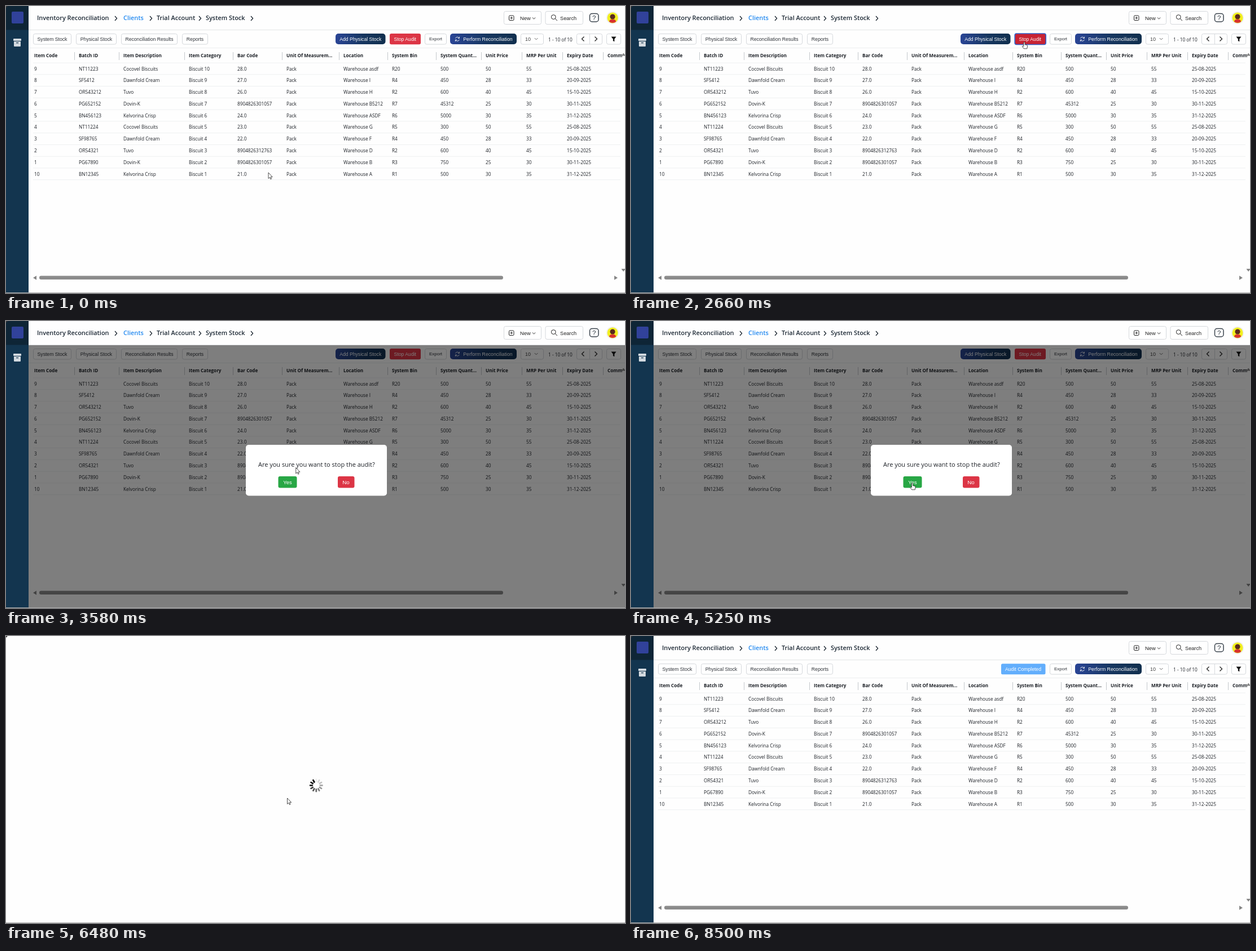
An HTML page that plays this animation: 1097 px wide and 510 px high, repeating every 9.34 s.

```html
<!DOCTYPE html>
<html lang="en">
<head>
<meta charset="utf-8">
<title>Stock audit</title>
<style>
  html, body { margin: 0; width: 100%; height: 100%; overflow: hidden; background: #fefefe; }
  svg { display: block; width: 100vw; height: 100vh; }
  text { font-family: "Open Sans", "Noto Sans", sans-serif; fill: #1d2127; white-space: pre; }
  .ui { font-family: "Liberation Sans", Arial, sans-serif; }
</style>
</head>
<body>
<svg id="stage" viewBox="0 0 1097 510">
  <defs>
    <linearGradient id="navy"><stop offset="0" stop-color="#2a4596"/><stop offset=".55" stop-color="#16365f"/><stop offset="1" stop-color="#112f4e"/></linearGradient>
  </defs>
  <g id="shell"></g>
  <g id="tools"></g>
  <g id="auditOpen"></g>
  <g id="auditDone"></g>
  <g id="rows"></g>
  <g id="modal"></g>
  <g id="spinner"></g>
  <path d="M0 0H3L0 3Z" fill="#333"/>
  <path d="M0 509.5H1097" stroke="#b0b0b0"/>
  <path id="arrow" d="M0 0V10.6L2.4 8.4L3.9 11.8L5.5 11.1L4 7.8H7.2Z" fill="#fff" stroke="#222" stroke-width=".8"/>
  <path id="hand" d="M0 0Q1.1 0 1.1 1.2V4.6L4.6 5.4Q5.7 5.8 5.6 7L4.8 11.8H-.8L-3.7 7.8Q-3.2 6.4-1.9 7.2L-1.1 8V1.2Q-1.1 0 0 0Z" fill="#fff" stroke="#222" stroke-width=".8"/>
</svg>
<script>
const LOOP = 9340;
const el = id => document.getElementById(id);

// Drawing helpers, each returning SVG markup
const text = (x, y, s, size, attrs = '') => `<text x="${x}" y="${y}" font-size="${size}" ${attrs}>${s}</text>`;
const ui = (x, y, s, size = 8.67, fill = '#30343a', anchor = 'middle') =>
  text(x, y, s, size, `class="ui" text-anchor="${anchor}" style="fill:${fill}"`);
const box = (x, y, w, h, fill, r = 0, attrs = '') =>
  `<rect x="${x}" y="${y}" width="${w}" height="${h}" rx="${r}" fill="${fill}" ${attrs}/>`;
const outline = (x1, x2, y = 49, h = 19.5) => box(x1 + .5, y + .5, x2 - x1 - 1, h - 1, '#fff', 3, 'stroke="#d5d8dc"');
const line = (d, stroke, w = 1) => `<path d="${d}" fill="none" stroke="${stroke}" stroke-width="${w}"/>`;
const shape = (d, fill) => `<path d="${d}" fill="${fill}"/>`;

function drawShell() {
  const crumbs = [[55, 'Inventory Reconciliation'], [208, 'Clients'], [267, 'Trial Account'], [354, 'System Stock']];
  return line('M40 42.5H1097', '#e2e4e6') +
    box(0, 0, 40, 510, '#13354f') + box(0, 0, 40, 42.5, '#0e2536') +
    box(10, 10, 21, 21, '#31429a', 2) +
    box(13, 58, 14, 4, '#d3dae0', 1) + shape('M14 63H26V71Q26 72 25 72H15Q14 72 14 71Z', '#d3dae0') +
    line('M18 65.5H22', '#13354f', 1.3) +
    crumbs.map(([x, s]) => text(x, 25, s, 10.9,
      `font-weight="600" style="fill:${s === 'Clients' ? '#2088f0' : '#1b2733'}"`)).join('') +
    [193, 255, 342, 434].map(x => line(`M${x} 18L${x + 3.5} 22L${x} 26`, '#222c36', 1.4)).join('') +
    outline(882, 949, 9, 24) + outline(955.5, 1023, 9, 24) +
    box(891.5, 17, 8.5, 8.5, 'none', 1.5, 'stroke="#222"') + line('M893.5 21.2H898M895.8 19V23.5', '#222') +
    ui(911, 25, 'New', 9.4, '#222', 'start') + line('M933 20.5L935.6 23L938.2 20.5', '#222') +
    '<circle cx="970.3" cy="19.6" r="3.9" fill="none" stroke="#222"/>' + line('M973.2 22.5L977 26.2', '#222') +
    ui(982, 25, 'Search', 9.2, '#222', 'start') +
    box(1034.5, 13.5, 15.5, 14.5, 'none', 4, 'stroke="#3a434c" stroke-width="1.5"') +
    ui(1042.3, 25, '?', 11.5, '#27313a') +
    box(1064, 10, 22, 22, '#f0eef0', 10) + '<circle cx="1075" cy="21" r="9.5" fill="#f2f020"/>' +
    shape('M1069 28Q1069 23.5 1075 23.5T1081 28Q1075 32 1069 28Z', '#d8322e') +
    '<circle cx="1075" cy="19" r="4.6" fill="#5a2a1c"/>';
}

const columns = [50, 129, 208, 324, 410, 497, 598, 684, 770, 850, 922, 994, 1066];
const titles = ['Item Code', 'Batch ID', 'Item Description', 'Item Category', 'Bar Code', 'Unit Of Measurem...',
  'Location', 'System Bin', 'System Quant...', 'Unit Price', 'MRP Per Unit', 'Expiry Date', 'Comm'];

function drawTools() {
  const tabs = [[48, 116, 'System Stock'], [124, 196, 'Physical Stock'], [204, 304, 'Reconciliation Results'], [312, 358, 'Reports']];
  return tabs.map(([a, b, s]) => outline(a, b) + ui((a + b) / 2, 61.7, s)).join('') +
    outline(742, 781) + ui(761.5, 61.3, 'Export', 8) +
    box(787, 49, 118, 19, 'url(#navy)', 5) + ui(854, 61.5, 'Perform Reconciliation', 8.7, '#fff') +
    line('M796.5 57.5A3.6 3.6 0 0 1 803 57M803.4 54.6V57.3H800.8M803.4 59.8A3.6 3.6 0 0 1 797 60.6M796.4 63V60.2H799', '#fff', .9) +
    outline(912, 953) + ui(920, 61.7, '10', 9, '#444', 'start') + line('M936.8 57L939.6 59.8L942.4 57', '#666') +
    text(961, 62.5, '1 - 10 of 10', 8.3) +
    outline(1011, 1057) + line('M1034.5 49V68', '#d5d8dc') +
    line('M1024.5 54.5L1020.5 58.5L1024.5 62.5M1043.5 54.5L1047.5 58.5L1043.5 62.5', '#222', 1.3) +
    outline(1064, 1090) + shape('M1072.5 54.5H1081.5L1078.3 58.8V63.2L1075.8 62V58.8Z', '#111') +
    line('M40 74.5H1097', '#eceef0') +
    titles.map((s, i) => text(columns[i], 91, s, 8.15, 'font-weight="700"') +
      (i ? line(`M${columns[i] - 7.5} 82V96`, '#c4c8cc') : '')).join('') +
    box(59, 479.5, 822, 6.5, '#8b8b8b', 3.2) +
    shape('M48 483L54 479.3V486.7ZM1084 483L1078 479.3V486.7ZM1090.5 88.5L1094.2 83.5L1098 88.5ZM1090.5 467L1094.2 472L1098 467Z', '#858585');
}

function drawRows() {
  const products = [
    ['Cocovel Biscuits', 50, 55, '25-08-2025'],
    ['Dawnfold Cream', 28, 33, '20-09-2025'],
    ['Tuvo', 40, 45, '15-10-2025'],
    ['Dovin-K', 25, 30, '30-11-2025'],
    ['Kelvorina Crisp', 30, 35, '31-12-2025']];
  // code, batch, bar code, location, bin, quantity
  const stock = `9 NT11223 28.0 asdf R20 500
8 SF5412 27.0 I R4 450
7 OR543212 26.0 H R2 600
6 PG652152 8904826301057 B5212 R7 45312
5 BN456123 24.0 ASDF R6 5000
4 NT11224 23.0 G R5 300
3 SF98765 22.0 F R4 450
2 OR54321 8904826312763 D R2 600
1 PG67890 8904826301057 B R3 750
10 BN12345 21.0 A R1 500`.split('\n');
  return stock.map((row, i) => {
    const [code, batch, bar, place, bin, quantity] = row.split(' ');
    const [name, price, mrp, expiry] = products[i % 5];
    const cells = [code, batch, name, `Biscuit ${10 - i}`, bar, 'Pack', `Warehouse ${place}`, bin, quantity, price, mrp, expiry];
    const y = 114.6 + 20.77 * i;
    return cells.map((s, k) => text(columns[k], y, s, 8.25)).join('') + line(`M48 ${y + 7.2}H1089`, '#eef0f1');
  }).join('') + line('M48 101H1089', '#eef0f1');
}

const drawSpinner = () => Array.from({ length: 12 }, (_, k) =>
  `<path d="M0-7V-10.7" stroke="#000" stroke-width="2.8" stroke-linecap="round" opacity="${.06 + .94 * k / 11}" transform="rotate(${30 * k})"/>`).join('');

el('shell').innerHTML = drawShell();
el('tools').innerHTML = drawTools();
el('rows').innerHTML = drawRows();
el('spinner').innerHTML = drawSpinner();
el('auditOpen').innerHTML = box(584, 49, 88.5, 19, 'url(#navy)', 5) + ui(628.2, 61.5, 'Add Physical Stock', 8.67, '#fff') +
  box(680, 49, 55, 19.3, '#dc3545', 3, 'id="stop"') + ui(707.3, 61.5, 'Stop Audit', 8.67, '#fff') +
  box(680.2, 49, 55, 19.5, 'none', 3, 'id="ring" stroke="#2f62cc" stroke-width="1.6"') +
  line('M1082 51V66', '#222').replace('<path', '<path id="caret"');
el('auditDone').innerHTML = box(656, 49.3, 78.5, 19, '#62aefc', 2.5) + ui(695, 61.5, 'Audit Completed', 8.67, '#fff');
el('modal').innerHTML = box(40, 43, 1057, 467, '#000', 0, 'opacity=".5"') + box(425, 220, 250, 90.5, '#fff', 5) +
  text(550.3, 258.7, 'Are you sure you want to stop the audit?', 11, 'text-anchor="middle"') +
  box(482.5, 276, 33, 20.5, '#28a745', 3) + ui(499, 289.5, 'Yes', 9.4, '#fff') +
  box(588, 276, 29.5, 20.5, '#dc3545', 3) + ui(602.5, 289.5, 'No', 9.8, '#fff');

const smooth = u => u * u * (3 - 2 * u);
const easeOut = u => 1 - (1 - u) ** 3;

// Pointer stops: time, x, y, easing into the stop
const pointerPath = [
  [0, 465, 296], [600, 465, 296], [1490, 697, 64], [3210, 697, 64], [3940, 489, 287, easeOut],
  [4250, 489, 287], [4700, 616, 298], [5160, 492, 294], [5250, 498.5, 288], [6640, 498.5, 288],
  [7800, 1054, 492], [8340, 1054, 492], [8500, 1066, 512], [LOOP, 1066, 512]];

function pointerAt(t) {
  const i = pointerPath.findIndex(p => p[0] > t);
  const [t0, x0, y0] = pointerPath[i - 1], [t1, x1, y1, ease = smooth] = pointerPath[i];
  const u = ease((t - t0) / (t1 - t0));
  return [x0 + (x1 - x0) * u, y0 + (y1 - y0) * u];
}

const show = (id, on) => { el(id).style.display = on ? '' : 'none'; };
const within = (v, a, b) => v >= a && v < b;

function render(t) {
  const [x, y] = pointerAt(t);
  const beforeReload = t < 5860;
  const modalOpen = within(t, 2690, 5710);
  const overChoice = modalOpen && within(y, 276, 297) && (within(x, 482, 516) || within(x, 588, 618));
  const hand = within(t, 1540, 2690) || overChoice;

  show('shell', beforeReload || t >= 7050);
  show('tools', beforeReload || t >= 7600);
  show('auditOpen', beforeReload);
  show('auditDone', t >= 7700);
  show('rows', beforeReload || t >= 7750);
  show('modal', modalOpen);
  show('ring', within(t, 2490, 2690));
  show('caret', within(t, 5710, 5770));
  el('stop').setAttribute('fill', within(t, 1400, 2690) ? '#c82333' : '#dc3545');

  // The spinner stalls for a moment while the page loads
  const step = t < 6480 ? Math.floor((t - 6480) / 83) : t < 6640 ? 0 : 1 + Math.floor((t - 6640) / 83);
  show('spinner', within(t, 5950, 7050));
  el('spinner').setAttribute('transform', `translate(549.8 265.5) rotate(${30 * step})`);

  show('hand', hand);
  show('arrow', !hand);
  el(hand ? 'hand' : 'arrow').setAttribute('transform', `translate(${x} ${y})`);
}

const start = performance.now();
function tick() {
  render((performance.now() - start) % LOOP);
  requestAnimationFrame(tick);
}
tick();
</script>
</body>
</html>
```
